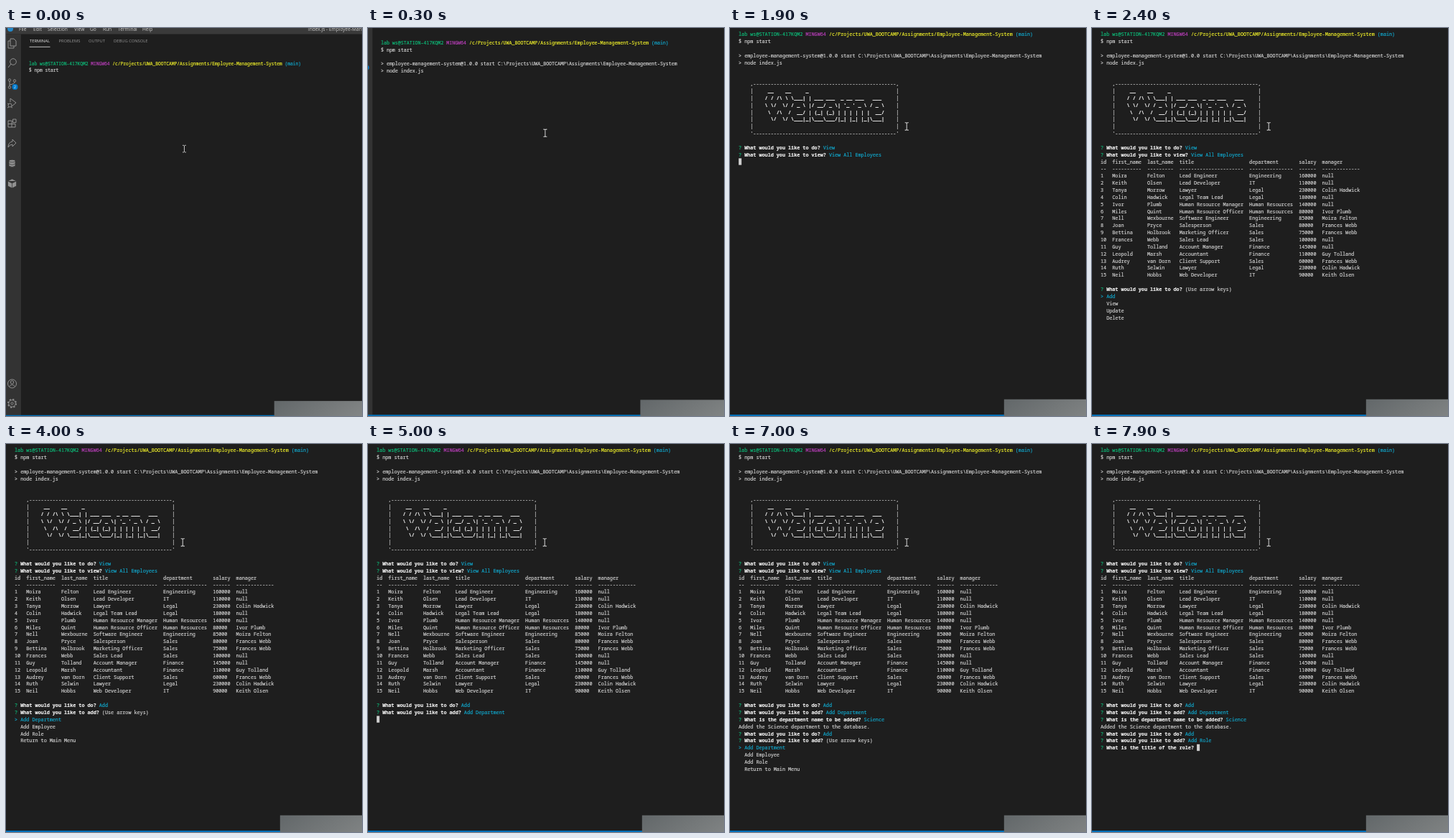
Animation, 496 px wide and 540 px high, one loop 8000 ms. Source, as an HTML page:

```html
<!DOCTYPE html>
<html lang="en">
<head>
<meta charset="utf-8">
<title>Employee terminal</title>
<style>
  html, body { margin: 0; width: 100%; height: 100%; overflow: hidden; background: #1e1e1e; }
  #view { position: fixed; inset: 0; overflow: hidden; contain: strict; }
  #stage { position: absolute; left: 0; top: 0; width: 496px; height: 540px; transform-origin: 0 0; }
  svg { position: absolute; left: 0; top: 0; overflow: visible; font-family: "Open Sans", "Noto Sans", sans-serif; }
  pre {
    position: absolute; left: 31.9px; top: 44.8px; margin: 0; color: #d2d2d2;
    font: 40px/58.27px "Noto Sans Mono", "DejaVu Sans Mono", monospace;
    -webkit-text-stroke: 1px; font-variant-ligatures: none;
    transform: scale(.15633); transform-origin: 0 0;
  }
  b { color: #f0f0f0; }
  i { font-style: normal; }
  .g { color: #0dbc79; } .m { color: #bc3fbc; } .y { color: #f0f02a; } .c { color: #11a8cd; }
  .block { background: #ccc; }
</style>
</head>
<body>
<div id="view"><div id="stage">
  <svg width="496" height="540">
    <rect width="530" height="8.5" fill="#3a3a3a"/>
    <rect y="8.5" width="20.9" height="540" fill="#333"/>
    <circle cx="6" cy="1" r="4" fill="#2489ca"/>
    <g font-size="6.6" fill="#ccc">
      <text x="18" y="3.6">File</text><text x="38" y="3.6">Edit</text>
      <text x="58" y="3.6">Selection</text><text x="95" y="3.6">View</text>
      <text x="117" y="3.6">Go</text><text x="135" y="3.6">Run</text>
      <text x="156" y="3.6">Terminal</text><text x="190" y="3.6">Help</text>
      <text x="421" y="3.6">index.js - Employee-Management-System</text>
    </g>
    <g font-size="5.8" fill="#969696">
      <text x="33" y="20.4" fill="#e7e7e7">TERMINAL</text><text x="73.5" y="20.4">PROBLEMS</text>
      <text x="115" y="20.4">OUTPUT</text><text x="150" y="20.4">DEBUG CONSOLE</text>
    </g>
    <path d="M32.5 26.3H61.5" stroke="#e7e7e7" stroke-width=".8"/>
    <g fill="none" stroke="#919191">
      <path d="M6 15h5l3 3v7H6zM6 18H3v10h8v-3"/>
      <path d="M7 50l-4 5"/><circle cx="10" cy="47" r="4.3"/>
      <path d="M5 74v7M12 75q0 3-7 4"/><circle cx="5" cy="72.5" r="1.7"/><circle cx="12" cy="73.5" r="1.7"/><circle cx="5" cy="82.5" r="1.7"/>
      <path d="M6 103v-5l8 6-6 5"/><circle cx="5.5" cy="107.5" r="2.5"/><path d="M2 105l2 1M2 111l2-1M9 111l-2-1"/>
      <path d="M3 129h5v9H3zM3 133.5h10v4.5H8M9.5 127h4.5v4.5H9.5z"/>
      <path d="M3 166q0-7 6-8v-3l5 5-5 5v-3q-4 0-6 4z"/>
      <g fill="#919191" stroke="#333" stroke-width=".7">
        <path d="M4 185v7q4.5 3 9 0v-7z"/><ellipse cx="8.5" cy="185" rx="4.5" ry="1.8"/><path d="M4 189q4.5 3 9 0"/>
        <path d="M2.5 213l6-3 6 3v7l-6 3-6-3zM2.5 213l6 3 6-3M8.5 216v7"/>
      </g>
      <circle cx="8.5" cy="495" r="6"/><circle cx="8.5" cy="493" r="2.2"/><path d="M4.5 499q4-5 8 0"/>
      <circle cx="8.5" cy="522.5" r="4.7"/><circle cx="8.5" cy="522.5" r="1.6"/>
      <circle cx="8.5" cy="522.5" r="5.7" stroke-width="1.6" stroke-dasharray="2.24"/>
    </g>
    <circle cx="12.5" cy="82" r="4" fill="#007acc"/>
    <text x="12.5" y="83.8" font-size="5" fill="#fff" text-anchor="middle">2</text>
  </svg>
  <pre id="term"></pre>
  <svg width="496" height="540">
    <defs>
      <linearGradient id="grey" x2="1" y2=".3">
        <stop stop-color="#626769"/><stop offset="1" stop-color="#858888"/>
      </linearGradient>
      <path id="beam" d="M246 163.3h1.6l.8.7.8-.7h1.6M248.400 164v8.200M246 172.900h1.600l.8-.7.8.7h1.600" fill="none"/>
    </defs>
    <rect y="538.8" width="530" height="10" fill="#0071bc"/>
    <rect x="373.7" y="519.1" width="150" height="30" fill="url(#grey)"/>
    <use href="#beam" stroke="#111" stroke-width="2"/>
    <use href="#beam" stroke="#d4d4d4"/>
  </svg>
</div></div>
<script>
const LOOP = 8000, STEP = 100, ZOOM_END = 660;
const stage = document.getElementById('stage'), term = document.getElementById('term');

const paint = (cls, s) => `<i class="${cls}">${s}</i>`;
const cyan = s => paint('c', s);
const cursor = paint('block', ' ');
const ask = (q, rest = '') => `${paint('g', '?')} <b>${q}</b> ${rest}`;
const answer = (q, a) => ask(q, cyan(a));
const menu = (q, items, pick, hint = !pick) => [
  ask(q, hint ? '(Use arrow keys)' : ''),
  ...items.map((s, i) => i === pick ? cyan('> ' + s) : '  ' + s)
];

const DO = 'What would you like to do?', VIEW = 'What would you like to view?',
  ADD = 'What would you like to add?', NAME = 'What is the department name to be added?';
const main = ['Add', 'View', 'Update', 'Delete'];
const views = ['View All Employees', 'View All Departments', 'View All Roles', 'Return to Main Menu'];
const adds = ['Add Department', 'Add Employee', 'Add Role', 'Return to Main Menu'];

const prompt = [
  [paint('g', 'lab ws@STATION-417KQM2'), paint('m', 'MINGW64'),
    paint('y', '/c/Projects/UWA_BOOTCAMP/Assignments/Employee-Management-System'), cyan('(main)')].join(' '),
  '$ npm start'
];
const launch = ['', '> employee-management-system@1.0.0 start C:\\Projects\\UWA_BOOTCAMP\\Assignments\\Employee-Management-System',
  '> node index.js'];

const art = String.raw`
 __    __     _
/ / /\ \ \___| | ___ ___  _ __ ___   ___
\ \/  \/ / _ \ |/ __/ _ \| '_ ' _ \ / _ \
 \  /\  /  __/ | (_| (_) | | | | | |  __/
  \/  \/ \___|_|\___\___/|_| |_| |_|\___|
`.split('\n').slice(1);
const edge = c => '    ' + c + '-'.repeat(49) + c;
const banner = ['', '', edge(','), ...art.map(s => `    |    <b>${s.padEnd(45)}</b>|`), edge("'"), ''];

const widths = [2, 10, 9, 22, 15, 6, 13];
const row = cells => cells.map((s, i) => s.padEnd(widths[i])).join('  ');
const staff = `Moira,Felton,Lead Engineer,Engineering,160000,null
Keith,Olsen,Lead Developer,IT,110000,null
Tanya,Morrow,Lawyer,Legal,230000,Colin Hadwick
Colin,Hadwick,Legal Team Lead,Legal,180000,null
Ivor,Plumb,Human Resource Manager,Human Resources,140000,null
Miles,Quint,Human Resource Officer,Human Resources,80000,Ivor Plumb
Nell,Wexbourne,Software Engineer,Engineering,85000,Moira Felton
Joan,Pryce,Salesperson,Sales,80000,Frances Webb
Bettina,Holbrook,Marketing Officer,Sales,75000,Frances Webb
Frances,Webb,Sales Lead,Sales,100000,null
Guy,Tolland,Account Manager,Finance,145000,null
Leopold,Marsh,Accountant,Finance,110000,Guy Tolland
Audrey,van Dorn,Client Support,Sales,60000,Frances Webb
Ruth,Selwin,Lawyer,Legal,230000,Colin Hadwick
Neil,Hobbs,Web Developer,IT,90000,Keith Olsen`.split('\n');
const table = [
  row(['id', 'first_name', 'last_name', 'title', 'department', 'salary', 'manager']),
  row(widths.map(n => '-'.repeat(n))),
  ...staff.map((s, i) => row([String(i + 1), ...s.split(',')])), ''
];

// Each step: time, lines that stay, lines shown until the next step.
const steps = [
  [0, prompt, []],
  [200, launch, []],
  [600, banner, menu(DO, main, 0)],
  [1200, [], menu(DO, main, 1)],
  [1500, [answer(DO, 'View')], menu(VIEW, views, 0)],
  [1900, [answer(VIEW, views[0])], [cursor]],
  [2000, table, menu(DO, main, 0)],
  [3200, [answer(DO, 'Add')], menu(ADD, adds, 0)],
  [4400, [answer(ADD, adds[0])], [cursor]],
  ...[...'Science', ''].map((_, i) =>
    [6100 + 75 * i, [], [ask(NAME, 'Science'.slice(0, i) + cursor)]]),
  [6700, [answer(NAME, 'Science')], [cursor]],
  [6800, ['Added the Science department to the database.'], menu(DO, main, 0)],
  [7000, [answer(DO, 'Add')], menu(ADD, adds, 0)],
  [7200, [], menu(ADD, adds, 1)],
  [7300, [], menu(ADD, adds, 2)],
  [7500, [answer(ADD, adds[2])], [cursor]],
  [7600, [], [ask('What is the title of the role?', cursor)]]
];

let shown = '';
function draw(now) {
  const t = Math.floor(now % LOOP / STEP) * STEP;
  const p = 1 - (1 - Math.min(t / ZOOM_END, 1)) ** 2;
  stage.style.transform = `translate(${-22.6 * p}px, ${-45 * p}px) scale(${1 + 0.0822 * p})`;
  const past = steps.filter(s => s[0] <= t);
  const html = [...past.flatMap(s => s[1]), ...past.at(-1)[2]].join('\n');
  if (html !== shown) term.innerHTML = shown = html;
}

const start = performance.now();
function tick() {
  draw(performance.now() - start);
  requestAnimationFrame(tick);
}
draw(0);
tick();
</script>
</body>
</html>
```
